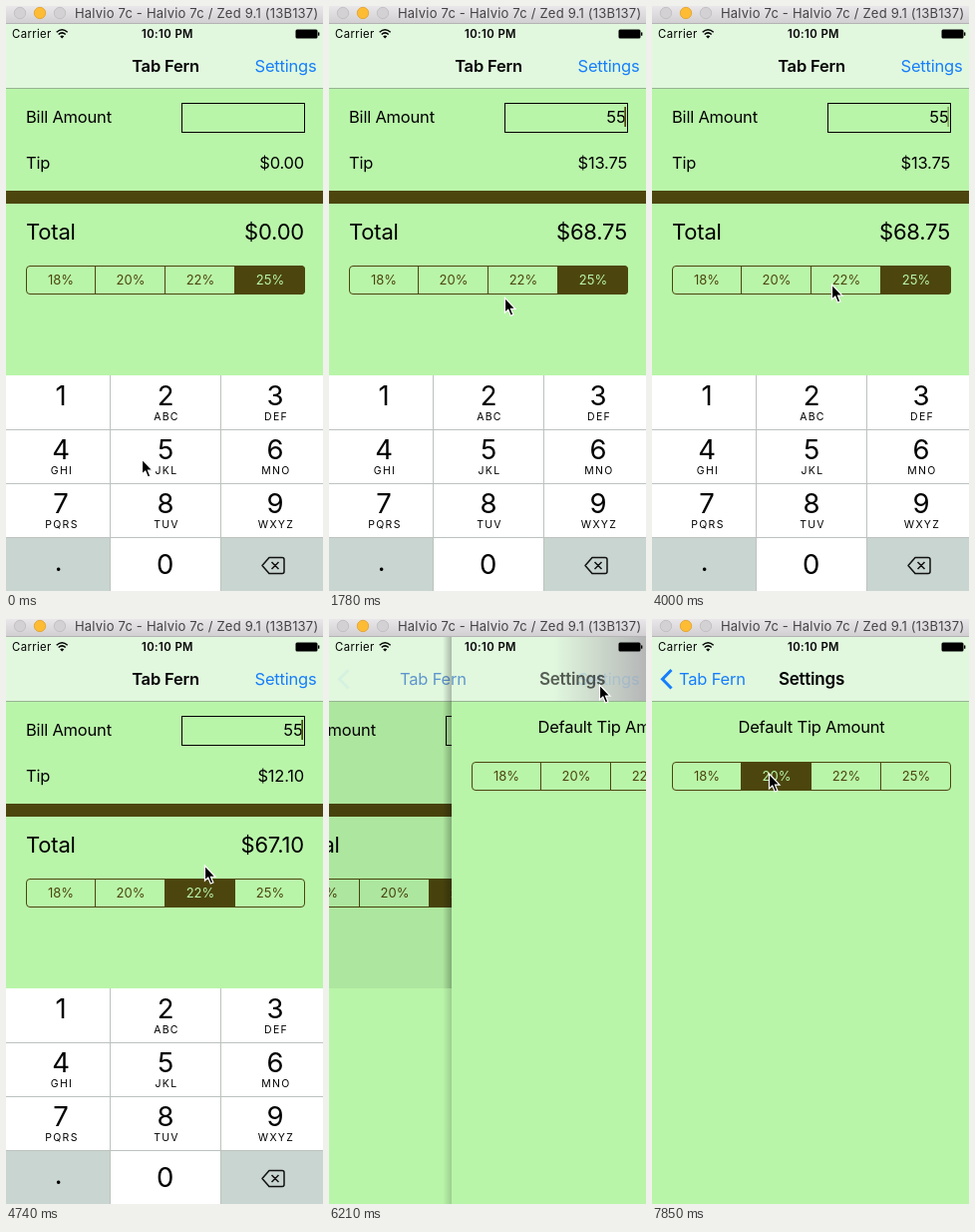
Animation of 318 by 586 pixels, one loop 8 s. Source, as an HTML page:

```html
<!DOCTYPE html>
<html lang="en">
<head>
<meta charset="utf-8">
<title>Tab Fern</title>
<style>
html, body { margin: 0; width: 100%; height: 100%; overflow: hidden; background: #b9f5a9; }
svg { display: block; width: 318px; height: 586px; font: 16.5px Inter, Roboto, sans-serif; letter-spacing: -.2px; }
</style>
</head>
<body>
<svg id="stage" viewBox="0 0 318 586"></svg>
<script>
const LOOP = 8000, STEP = LOOP / 54;
const GREEN = '#b9f5a9', OLIVE = '#4c460e', BLUE = '#167efb', KEY = '#c9d5d0';
const APP = 'Tab Fern', DEVICE = 'Halvio 7c';
const RATES = [18, 20, 22, 25];
const stage = document.getElementById('stage');

const rect = (x, y, w, h, fill, more = '') =>
  `<rect x="${x}" y="${y}" width="${w}" height="${h}" fill="${fill}" ${more}/>`;
const line = (d, color, width = 1, more = '') =>
  `<path d="${d}" fill="none" stroke="${color}" stroke-width="${width}" ${more}/>`;
const text = (x, y, s, more = '') => `<text x="${x}" y="${y}" ${more}>${s}</text>`;
const MID = 'text-anchor="middle"', END = 'text-anchor="end"', BOLD = 'font-weight="600"';
const group = (dx, body, opacity = 1) =>
  `<g transform="translate(${Math.round(dx)})" opacity="${opacity}">${body}</g>`;

const defs = `<defs>
  <linearGradient id="chrome" x2="0" y2="1"><stop stop-color="#e9e7e9"/><stop offset="1" stop-color="#d0ced0"/></linearGradient>
  <linearGradient id="edge"><stop stop-color="#000" stop-opacity="0"/><stop offset="1" stop-color="#000" stop-opacity=".25"/></linearGradient>
  <linearGradient id="haze"><stop stop-color="#b3b3b5" stop-opacity="0"/><stop offset="1" stop-color="#b3b3b5"/></linearGradient>
  ${[260, 143].map(y => `<clipPath id="seg${y}">${rect(20, y, 280, 29, '#000', 'rx="4"')}</clipPath>`).join('')}
</defs>`;

// pointer tip: [ms, x, y]
const PATH = [
  [0, 137, 455], [148, 139, 453], [444, 148, 444], [1630, 148, 444], [1778, 177, 293],
  [2222, 181, 280], [4450, 181, 280], [4593, 184, 276], [4741, 200, 248], [5037, 255, 130],
  [5480, 272, 67], [6222, 272, 67], [6667, 259, 92], [7259, 128, 152], [7407, 118, 156], [LOOP, 118, 156]
];

function pointer(t) {
  const i = PATH.findIndex(p => p[0] > t), [t0, x0, y0] = PATH[i - 1], [t1, x1, y1] = PATH[i];
  const u = (t - t0) / (t1 - t0);
  return `<path transform="translate(${x0 + (x1 - x0) * u} ${y0 + (y1 - y0) * u})"
    d="M-.5-1V14L2.8 11 5.3 17 7.9 15.9 5.5 10.2H10Z" stroke="#fff" stroke-width="1.2"/>`;
}

function caret(t) {
  if (t > 700 && t < 1900) return 1;
  const u = (t - 2519 + 3 * 1037) % 1037;
  return u < 440 ? 1 : u < 592 ? .45 : u < 885 ? 0 : .45;
}

function segments(y, selected, pressed) {
  let fills = '', labels = '';
  RATES.forEach((r, i) => {
    const x = 20 + 70 * i, on = r === selected;
    if (on || r === pressed) fills += rect(x - 1, y, 71, 29, OLIVE, on ? '' : 'opacity=".15"');
    labels += text(x + 35, y + 19, r + '%', `${MID} fill="${on ? GREEN : OLIVE}"`);
  });
  return `<g clip-path="url(#seg${y})">${fills}</g>` +
    rect(20.5, y + .5, 279, 28, 'none', `rx="3.5" stroke="${OLIVE}"`) +
    line(`M89.5 ${y}v29M159.5 ${y}v29M229.5 ${y}v29`, OLIVE) +
    `<g font-size="13" style="letter-spacing:0">${labels}</g>`;
}

function keypad(pressed) {
  const letters = ['', 'ABC', 'DEF', 'GHI', 'JKL', 'MNO', 'PQRS', 'TUV', 'WXYZ'], cx = [55, 160, 270];
  let s = rect(0, 370, 318, 216, '#fff') + rect(0, 532, 104, 54, KEY) + rect(216, 532, 102, 54, KEY);
  if (pressed) s += rect(105, 425, 110, 53, KEY);
  s += line('M0 424.5H318M0 478.5H318M0 532.5H318M104.5 370V586M215.5 370V586', '#bcc2bf');
  letters.forEach((name, i) => {
    const x = cx[i % 3], y = 400 + 54 * (i / 3 | 0);
    s += text(x, y, i + 1, `${MID} font-size="27.5"`) +
      text(x + 1, y + 15, name, `${MID} font-size="10.5" style="letter-spacing:1.3px"`);
  });
  return s + text(159.5, 569, 0, `${MID} font-size="27.5"`) + text(52.5, 566, '.', `${MID} font-size="27"`) +
    line('M264 552.5H277Q279 552.5 279 554.5V566.5Q279 568.5 277 568.5H264L257 560.5ZM266.5 557l7 7m0-7l-7 7', '#111', 1.5, 'stroke-linejoin="round"');
}

function calculator(t) {
  const amount = t > 1450 ? 55 : t > 850 ? 5 : 0, rate = t > 4250 ? 22 : 25, tip = amount * rate / 100;
  const money = v => '$' + v.toFixed(2);
  return rect(0, 82, 318, 288, GREEN) +
    text(20, 117, 'Bill Amount') + rect(176.5, 97.5, 123, 29, 'none', 'stroke="#000"') +
    text(297.5, 117, amount || '', END) +
    rect(296.3, 101, 1.7, 20, OLIVE, `opacity="${caret(t)}"`) +
    text(20, 163, 'Tip') + text(299, 163, money(tip), END) +
    rect(0, 185, 318, 13, OLIVE) +
    `<g font-size="22">${text(20, 234, 'Total')}${text(299, 234, money(tip + amount), END)}</g>` +
    segments(260, rate, t > 4100 && t < 4250 ? 22 : 0);
}

function settings(t) {
  return rect(-9, 18, 9, 352, 'url(#edge)') + rect(-9, 370, 9, 216, 'url(#edge)', 'opacity=".6"') +
    rect(0, 83, 318, 503, GREEN) +
    text(160, 114, 'Default Tip Amount', MID) +
    segments(143, t > 7500 ? 20 : 25, t > 7350 && t < 7500 ? 20 : 0);
}

function navBar(t, p) {
  const q = 1 - p, button = t > 5870 ? .4 * q : 1;
  const back = `color-mix(in srgb, ${BLUE} ${100 * p}%, #777)`;
  return rect(0, 18, 318, 64, '#e1f8de') +
    rect(225, 18, 93, 64, 'url(#haze)', `opacity="${4 * p * q}"`) +
    line('M0 82.5H318', '#98b493') +
    text(311.5, 66, 'Settings', `${END} fill="${BLUE}" opacity="${button}"`) +
    group(-114 * p, text(160, 66, APP, `${MID} ${BOLD}`), Math.max(0, 1 - 2 * p)) +
    group(114 * q, text(27, 66, APP, `style="fill:${back}"`), Math.sqrt(p)) +
    group(217 * q, text(160, 66, 'Settings', `${MID} ${BOLD} font-size="17"`), p) +
    line('M19.5 51L10.5 60.2 19.5 69.5', BLUE, 3, `opacity="${p ** 6}"`);
}

function statusBar() {
  return `<g font-size="11.3" style="letter-spacing:.4px">${text(6, 32, 'Carrier')}` +
    text(162, 32, '10:10 PM', `${MID} ${BOLD}`) + '</g>' +
    line('M50.7 26.2Q56.2 21.3 61.7 26.2M52.7 28.5Q56.2 25.3 59.7 28.5', '#000', 1.5) +
    '<path d="M54.2 30.4Q56.2 28.8 58.2 30.4L56.2 32.6Z"/>' +
    rect(290.5, 23.5, 22, 9, '#000', 'rx="1.5"') + rect(313, 26.2, 1.4, 3.6, '#000', 'rx=".6"');
}

function titleBar() {
  const dot = (x, fill, edge) => `<circle cx="${x}" cy="7" r="5.7" fill="${fill}" stroke="${edge}" stroke-width=".8"/>`;
  return rect(0, 0, 318, 18, 'url(#chrome)') + line('M0 17.5H318', '#b5b3b5') +
    dot(14, '#d3d1d3', '#bdbbbd') + dot(34, '#fdbc34', '#e0a02c') + dot(54, '#d3d1d3', '#bdbbbd') +
    text(69, 12, `${DEVICE} - ${DEVICE} / Zed 9.1 (13B137)`, 'font-size="13" fill="#454345" style="letter-spacing:.2px"');
}

function scene(t) {
  const u = Math.min(1, Math.max(0, (t - 6097) / 460)), p = 1 - (1 - u) ** 3;
  const pressed = (t > 700 && t < 850) || (t > 1300 && t < 1450);
  return defs + rect(0, 0, 318, 586, GREEN) +
    (p < 1 ? group(-96 * p, calculator(t)) + rect(0, 82, 318, 288, '#000', `opacity="${.1 * p}"`) : '') +
    (p ? '' : keypad(pressed)) +
    navBar(t, p) +
    (p ? group(318 * (1 - p), settings(t)) : '') +
    statusBar() + titleBar() + pointer(t);
}

// the screen refreshes in even steps
let shown = -1;
function tick() {
  const k = Math.floor((performance.now() % LOOP + 15) / STEP) % 54;
  if (k !== shown) stage.innerHTML = scene((shown = k) * STEP);
  requestAnimationFrame(tick);
}
tick();
</script>
</body>
</html>
```
